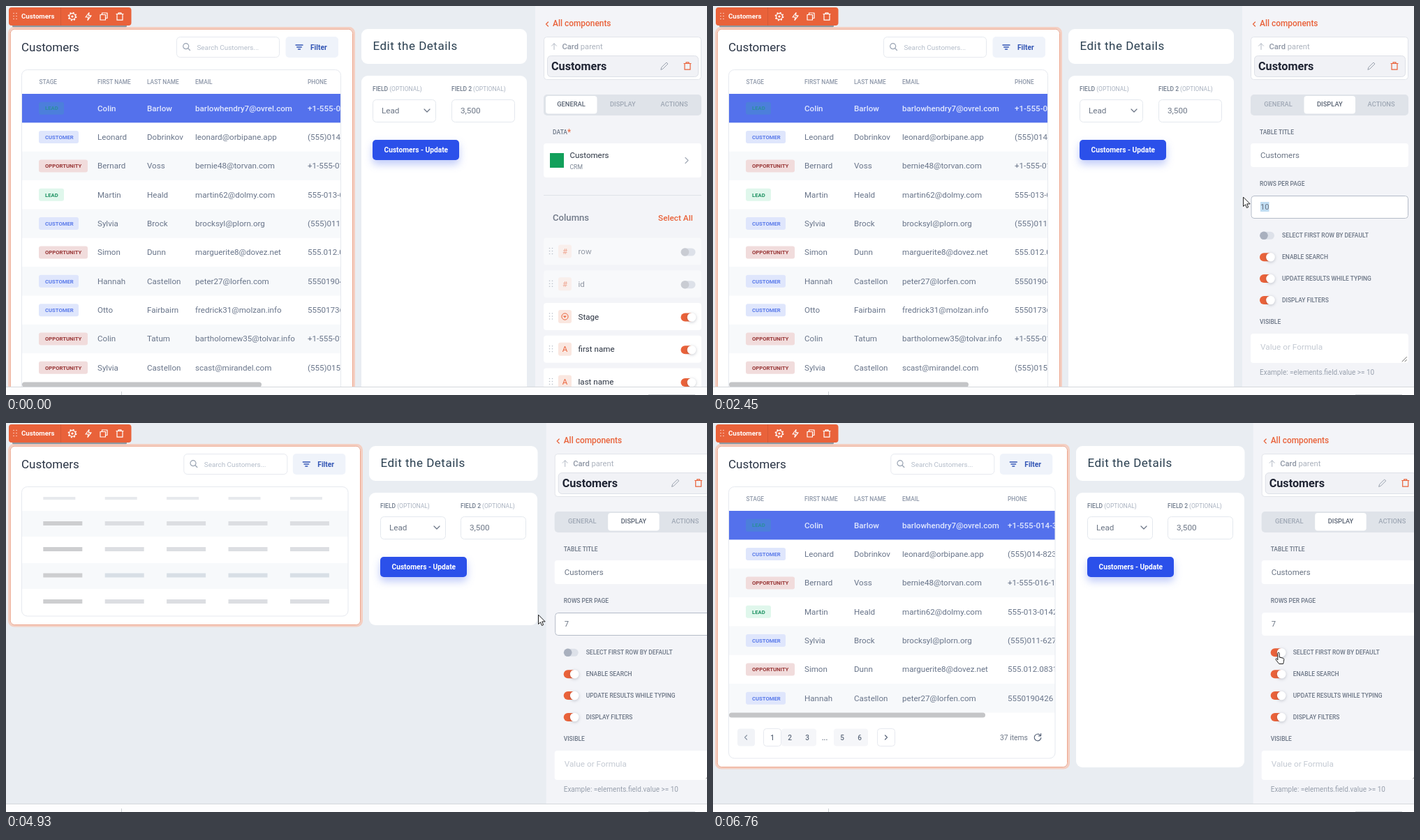
An HTML page that plays this animation: 1004x558 px, repeating every 7.51 s.

```html
<!DOCTYPE html>
<html lang="en">
<head>
<meta charset="utf-8">
<title>Table builder</title>
<style>
html, body { margin: 0; width: 100%; height: 100%; overflow: hidden; background: #e9edf2; }
svg { display: block; }
body > svg { width: 100vw; height: 100vh; }
text { font-family: Roboto, "Open Sans", sans-serif; white-space: pre; }
.glow { filter: drop-shadow(0 6px 6px rgba(43, 80, 234, .3)); }
.knob { filter: drop-shadow(0 1px 2px rgba(60, 70, 90, .3)); }
</style>
</head>
<body>
<svg id="stage" viewBox="0 0 1004 558"></svg>
<script>
const LOOP = 7510, WIDE = 3560, ORANGE = '#e9623a', GREY = '#6b7585', PALE = '#e6e9ef';
const stage = document.getElementById('stage');

const text = (x, y, s, size, fill, weight = 400, more = '') =>
  `<text x="${x}" y="${y}" font-size="${size}" fill="${fill}" font-weight="${weight}" ${more}>${s}</text>`;
const mid = (x, y, s, size, fill, weight) => text(x, y, s, size, fill, weight, 'text-anchor="middle"');
const box = (x, y, w, h, fill, r = 0, stroke = 'none', sw = 1) =>
  `<rect x="${x}" y="${y}" width="${w}" height="${h}" fill="${fill}" rx="${r}" stroke="${stroke}" stroke-width="${sw}"/>`;
const dot = (x, y, r, fill, more = '') => `<circle cx="${x}" cy="${y}" r="${r}" fill="${fill}" ${more}/>`;
const path = (d, stroke, w = 1.2, fill = 'none') =>
  `<path d="${d}" stroke="${stroke}" stroke-width="${w}" fill="${fill}" stroke-linejoin="round" stroke-linecap="round"/>`;
const at = (x, y, s) => `<g transform="translate(${x} ${y})">${s}</g>`;
// Spans are pairs of start and end times in ms.
const on = (spans, s) => `<g data-on="${spans}">${s}</g>`;

const grip = (x, y, fill) => [0, 1, 2].map(i =>
  dot(x, y + i * 4, .8, fill) + dot(x + 4, y + i * 4, .8, fill)).join('');
const trash = (x, y, c) => at(x, y, path('M-5-3.5H5M-2-3.5V-5.2H2V-3.5M-4-3.5V5.2H4V-3.5', c));
const lens = (x, y) => at(x, y, path('M3 3L5.5 5.5', '#9aa4b3') + dot(-.3, -.3, 4, 'none', 'stroke="#9aa4b3" stroke-width="1.2"'));
const chevron = (x, y, dir, c, k = 3) => at(x, y, path(
  { l: `M${k / 2}-${k}L${-k / 2} 0 ${k / 2} ${k}`, r: `M${-k / 2}-${k}L${k / 2} 0 ${-k / 2} ${k}`, d: `M${-k - 1}-2L0 2 ${k + 1}-2` }[dir], c));
const toggle = (x, y, isOn, knob = '#a9b0be') => isOn
  ? box(x, y - 6, 20, 12, ORANGE, 6) + dot(x + 15.5, y, 6.3, '#fff', 'class="knob"')
  : box(x, y - 5.5, 21, 11, '#dde1e9', 5.5) + dot(x + 6, y, 5.8, knob);

// first name, last name, email, phone, stage
const people = [
  'Colin|Barlow|barlowhendry7@ovrel.com|+1-555-014-3682|Lead',
  'Leonard|Dobrinkov|leonard@orbipane.app|(555)014-8236|Customer',
  'Bernard|Voss|bernie48@torvan.com|+1-555-016-1970|Opportunity',
  'Martin|Heald|martin62@dolmy.com|555-013-0142|Lead',
  'Sylvia|Brock|brocksyl@plorn.org|(555)011-6270x41|Customer',
  'Simon|Dunn|marguerite8@dovez.net|555.012.0831x4|Opportunity',
  'Hannah|Castellon|peter27@lorfen.com|5550190426|Customer',
  'Otto|Fairbairn|fredrick31@molzan.info|5550173628|Customer',
  'Colin|Tatum|bartholomew35@tolvar.info|+1-555-018-4520|Opportunity',
  'Sylvia|Castellon|scast@mirandel.com|(555)015-3402|Opportunity'
].map(s => s.split('|'));
const badges = {
  Lead: [36, '#e0f7ec', '#1f9363'],
  Customer: [57, '#dfe6fc', '#5b7bea'],
  Opportunity: [70, '#f1dcdc', '#983636']
};

function badge(stage, y, picked) {
  const [w, bg, ink] = badges[stage];
  return box(47, y - 9, w, 18, picked ? '#4c7fdb' : bg, 3) +
    text(56, y + 2.8, stage.toUpperCase(), 7.7, picked ? '#2c8f9c' : ink, 700);
}

const heads = (names, cols) => names.map((n, i) => text(cols[i], 112, n, 8.4, '#8e98a9', 500)).join('');
const frameTable = (right, bottom) => box(22.5, 91.5, right - 22.5, bottom - 91.5, 'none', 8, PALE);

function table(right, bottom, cols, rowH, count, plain, bar, barY) {
  let s = '';
  people.slice(0, count).forEach((p, i) => {
    const top = 126 + i * rowH, y = top + rowH / 2, first = i === 0;
    if (i % 2 === 0) s += box(23, top, right - 23, rowH, first ? '#5471ec' : '#f7f9fb');
    const cell = (n, v, c) => text(cols[n], y + 4, v, 11.6, first ? '#e0e7fd' : c, first ? 500 : 400);
    s += plain ? cell(0, p[4], '#474d57') : badge(p[4], y, first);
    for (let n = 0; n < 4; n++) s += cell(n + 1, p[n], '#69758a');
  });
  return `<svg width="${right}" height="558">` +
    heads(['STAGE', 'FIRST NAME', 'LAST NAME', 'EMAIL', 'PHONE'], cols) + s + '</svg>' +
    frameTable(right, bottom) + box(23, barY, bar, 7, '#c4c5c7', 3.5);
}

function pager(y, full) {
  const num = (x, n) => mid(x, y + 3.7, n, 10, '#5f6b7d', 500);
  const tile = (x, w, c) => box(x, y - 12.5, w, 25, c, 4);
  const edge = x => box(x, y - 12.5, 25, 25, '#fff', 4, PALE);
  return tile(35, 25, '#f1f3f7') + chevron(47, y, 'l', '#8b95a5') +
    (full ? tile(98, 50, '#f5f6f9') + tile(173, 49, '#f5f6f9') +
      [[110, 2], [135, 3], [160, '...'], [185, 5], [210, 6]].map(a => num(...a)).join('') +
      text(411, y + 3.7, '37 items', 10.3, GREY) : '') +
    edge(72.5) + num(85, 1) + edge(full ? 235.5 : 110.5) + chevron(full ? 248 : 123, y, 'r', '#59657a') +
    at(465, y, path('M3.6-3.2A4.8 4.8 0 1 0 4.8 .6M4.6-5.4V-2.2H1.4', '#59657a'));
}

const frame = (right, bottom) =>
  box(4.5, 31.5, right - 3, bottom - 30.5, 'none', 7, '#f4cfc2', 3) +
  box(6.3, 33.3, right - 6.8, bottom - 33.8, 'none', 6, '#eda68d');

const card = (right, bottom) => box(5, 33, right - 5, bottom - 33, '#fff', 8);

const topBar = dx => text(22, 65, 'Customers', 17, '#2a3445') +
  box(244.5 + dx, 44.5, 147 + dx / 10, 29, '#fff', 5, PALE) + lens(258 + dx, 58) +
  text(273.5 + dx, 62.7, 'Search Customers...', 9.9, '#b3bcc9') +
  box(400.5 + dx, 44, 75.5, 30, '#eff3fa', 5) +
  at(420 + dx, 59, path('M-5-3H5M-3.3 0H3.3M-1.5 3H1.5', '#3356b5', 1.4)) +
  text(436 + dx, 62.5, 'Filter', 10.2, '#3356b5', 700);

const formCard = (x, w, bottom) => box(x, 100, w, bottom - 100, '#fff', 9);

function form(x, w, fieldW, x2) {
  const left = x + 16.5, field = (fx, name, value) =>
    text(fx, 121.5, `${name}<tspan fill="#a9b2c0" font-weight="400"> (OPTIONAL)</tspan>`, 8.5, '#6f7b8c', 500) +
    box(fx + .5, 134.5, fieldW, 32, '#fff', 5, '#e4e8ee') + text(fx + 13, 154, value, 11.7, GREY);
  return box(x, 33, w, 50, '#fff', 9) +
    text(left, 63, 'Edit the Details', 17, '#2a3f50', 400, 'letter-spacing=".5"') +
    field(left - .5, 'FIELD', 'Lead') + chevron(left + fieldW - 12.5, 150, 'd', '#6b7585') + field(x2, 'FIELD 2', '3,500') +
    `<g class="glow">${box(left - .5, 192, 124, 29, '#2b50ea', 5)}</g>` +
    text(left + 16, 210, 'Customers - Update', 10.2, '#fff', 700);
}

function skeleton() {
  const bars = (y, w, h, c, from = 0, to = 5) => {
    let s = '';
    for (let i = from; i < to; i++) s += box(53.3 + i * 88.4, y - h / 2, w, h, c);
    return s;
  };
  const rows = [144, 181, 218.5, 256];
  const lead = c => rows.map(y => bars(y, 56, 6, c, 0, 1)).join('');
  return [126, 201].map(y => box(23, y, 467, 37, '#f7f9fb')).join('') + frameTable(490, 277) +
    bars(108, 46, 4, '#e7e9ed') + rows.map((y, i) => bars(y, 56, 6, i === 2 ? '#d8dfe6' : '#dcdee2', 1)).join('') +
    on('0,4170', lead('#d6d6d8')) + on('4170,9999', lead('#cdced0'));
}

const toolbar = box(9, 27, 164, 3.2, '#8e979f', 1.5) + box(4, 2, 175.5, 26, ORANGE, 4) +
  grip(11, 10.5, '#fbd5c8') + text(22, 18, 'Customers', 9.7, '#fff', 700) + box(78, 2, 1, 26, '#d65a35') +
  at(95, 15, dot(0, 0, 4.4, 'none', 'stroke="#fff" stroke-width="1.2"') + dot(0, 0, 1.6, '#fff') +
    dot(0, 0, 5.6, 'none', 'stroke="#fff" stroke-width="1.6" stroke-dasharray="2 2.4"')) +
  at(118, 15, path('M1-5.5L-4 1H0L-1 5.5 4-1.2H.4Z', '#fff')) +
  at(140, 15, path('M-2.5-2.5V-5H5V2.5H2.5M-5-2.5H2.5V5H-5Z', '#fff')) + trash(163, 15, '#fff');

const label = (x, y, s) => text(x, y, s, 8.5, GREY, 500);
const tabs = active => box(770, 127, 226, 30, '#dfe3e9', 5) + box(773 + active * 73.5, 129, 73.5, 25.5, '#fff', 4) +
  ['GENERAL', 'DISPLAY', 'ACTIONS'].map((n, i) =>
    mid(809.5 + i * 73.8, 144.4, n, 9.3, i === active ? '#586272' : '#9fa8b5', 500)).join('');

function column(name, icon, y, isOn) {
  const glyph = icon ? mid(800.5, y + 4, icon, 11.5, ORANGE, 400)
    : dot(800.5, y, 4.6, 'none', `stroke="${ORANGE}"`) + path(`M798.6 ${y - .8}h3.8l-1.9 2.2z`, ORANGE, .5, ORANGE);
  return box(770, y - 19.5, 226, 39, isOn ? '#fff' : '#f8f9fb', 4) + grip(778.5, y - 4.5, '#b9bfc9') +
    `<g opacity="${isOn ? 1 : .55}">${box(791, y - 9.5, 19, 19, '#fae7e0', 3) + glyph}</g>` +
    text(819.5, y + 4, name, 11.6, isOn ? '#2a3240' : '#9097a3') +
    toggle(966.5, y + 1, isOn, '#c9ccd3');
}

const general = tabs(0) + on('820,1350', mid(883.3, 144.4, 'DISPLAY', 9.3, '#77808e', 500)) +
  label(783, 184, 'DATA') + text(804, 185, '*', 12, ORANGE) +
  box(770, 197, 226, 49, '#fff', 4) + box(779, 211, 20, 21, '#12a05b') +
  text(807.5, 218, 'Customers', 11.5, '#2b3442') + text(807.5, 234, 'CRM', 8.6, '#7b8594') +
  chevron(975, 221.5, 'r', '#a2aab6', 4) + box(770, 271, 226, 1, '#dfe2e8') +
  text(783, 308, 'Columns', 13.1, '#717a89', 500) + text(934, 308, 'Select All', 11.8, ORANGE, 500) +
  column('row', '#', 352, false) + column('id', '#', 398.7, false) + column('Stage', '', 445.5, true) +
  column('first name', 'A', 492.2, true) + column('last name', 'A', 539, true);

const display = tabs(1) + label(783, 184, 'TABLE TITLE') + box(770, 197, 226, 34, '#fff', 4) +
  text(784, 218, 'Customers', 11.5, GREY) + label(783, 258, 'ROWS PER PAGE') +
  box(770.5, 272, 225.5, 33, '#fff', 4) +
  on('2050,6560', box(771, 272.5, 224.5, 32, '#fff', 4, '#b4bbc8')) +
  on('2190,3290', box(784, 281, 12.5, 14, '#c0ddf2')) +
  on('0,3290', text(784, 292, '10', 11.3, GREY)) + on('3290,9999', text(784, 292, '7', 11.3, GREY)) +
  on('3290,3830,4370,4930,5470,6560', box(788.3, 281, 1, 14, '#222')) +
  on('0,6630', toggle(783, 329.3, false)) + on('6630,9999', toggle(783, 329.3, true)) +
  ['SELECT FIRST ROW BY DEFAULT', 'ENABLE SEARCH', 'UPDATE RESULTS WHILE TYPING', 'DISPLAY FILTERS'].map((n, i) =>
    (i ? toggle(783, 329.3 + i * 30.9, true) : '') + label(815, 332.2 + i * 30.9, n)).join('') +
  label(783, 455.5, 'VISIBLE') + box(770, 470, 226, 42, '#fff', 4) +
  text(784, 493, 'Value or Formula', 11.8, '#c4cad3') + path('M987 510L993.500 503.500M991 510L993.500 507.500', '#777', 1) +
  text(783, 529, 'Example: =elements.field.value >= 10', 10, '#98a0ad');

const panel = box(758, 0, 262, 546, '#f3f4f8') + chevron(775, 26, 'l', ORANGE) +
  text(783, 29, 'All components', 11.9, ORANGE, 500) + box(770.5, 44.5, 225, 61, '#fff', 4, '#e1e4ea') +
  at(785, 58, path('M0 4.500V-4M-3.500-.8L0-4.300 3.500-.8', '#b2b9c4', 1)) +
  text(796.5, 62, 'Card<tspan fill="#abb2bd" font-weight="400"> parent</tspan>', 11.2, '#8d95a3', 500) +
  box(775.5, 71.5, 216, 30, '#f1f2f6', 5, '#dde0e7') + text(781, 91.500, 'Customers', 16.2, '#1f2433', 700) +
  at(943, 86, path('M-5 5L-4 1.800 3-5 5-3-2 4Z', '#9aa2ae', 1)) + trash(976, 86, ORANGE) +
  on('0,1350', general) + on('1350,9999', display);

const cursor = '<g id="cursor"><g id="halo">' + dot(0, 0, 11.2, '#f4e935', 'opacity=".75"') + '</g>' +
  '<g id="arrow">' + path('M0 0V13L3 10.200 5 15 7.200 14 5.200 9.400H9.300Z', '#222', 1, '#fff') + '</g>' +
  '<g id="hand" transform="translate(-4.7 -.3)">' +
  path('M3.5 10.5V1.5a1.2 1.2 0 0 1 2.4 0V7l5 1.2q1.8.5 1.6 2.3L12 13.5 11.3 16.5H5.5L1 10.8q-.9-1.4.4-1.9.9-.2 2.1 1.6Z', '#222', 1, '#fff') + '</g>' +
  '<g id="beam">' + path('M-2-7H2M0-7V7M-2 7H2', '#333', 1) + '</g></g>';

const wideCols = [47.5, 131, 202, 271, 422];
stage.innerHTML = box(0, 0, 1004, 558, '#e9edf2') +
  on('0,3560', card(497, 600) + frame(497, 600) + topBar(0) +
    table(479.5, 600, [47.5, 131, 202, 271, 432], 41.35, 10, false, 343, 539.5) +
    formCard(509, 237, 600) + form(509, 237, 90, 638)) +
  on('3560,9999',
    on('3560,3630', card(508, 233.5) + frame(508, 199) + frameTable(490, 185) + pager(155, false) + formCard(520, 241, 233.5) +
      heads(['STAGE', 'FIRST NAME', 'LAST NAME', 'EMAIL', 'PHONE', 'AMOUNT, $'], [47, 107, 197, 284, 345, 410])) +
    on('3630,5270', card(508, 290) + frame(508, 290) + skeleton() + formCard(520, 241, 290)) +
    on('5270,5340', card(508, 467) + frame(508, 467) + pager(424, true) + formCard(520, 241, 467) +
      table(490, 454, [47.5, 125, 197, 265.5, 417], 37.4, 7, true, 371, 388)) +
    on('5340,9999', card(508, 494) + frame(508, 494) + pager(451, true) + formCard(520, 241, 494) +
      table(490, 481, wideCols, 41.35, 7, false, 367, 415.5)) +
    topBar(10.3) + form(520, 241.5, 93, 651)) +
  toolbar + `<g id="panel">${panel}</g>` +
  box(0, 546, 1004, 12, '#fdfdfe') + box(0, 546, 1004, 1, '#d5d8dc') + box(165, 553, 1, 5, '#ccd0d5') +
  box(920, 557, 67, 1, '#d5d8dc') + cursor;

// time, x, y of the pointer tip
const route = [[0, 938, 545], [480, 901, 236], [820, 870, 143.5], [1622, 870, 143.5], [1980, 825, 280], [2050, 797, 288],
  [2320, 759.5, 274.5], [2812, 759.5, 274.5], [3020, 762.5, 275.5], [5800, 762.5, 275.5], [6360, 810, 329.3], [LOOP, 810, 329.3]];
const pointers = {
  cursor: [70, LOOP],
  halo: [1220, 1420, 2050, 2450, 6560, 6760],
  hand: [890, 1690, 6290, LOOP],
  beam: [1980, 2250],
  arrow: [70, 890, 1690, 1980, 2250, 6290]
};
const STEP = 69;

const within = (spans, t) => spans.some((a, i) => i % 2 === 0 && t >= a && t < spans[i + 1]);
const layers = [...stage.querySelectorAll('[data-on]')].map(el => [el, el.dataset.on.split(',').map(Number)]);
for (const id in pointers) layers.push([document.getElementById(id), pointers[id]]);
const pointer = document.getElementById('cursor'), side = document.getElementById('panel');

function tip(t) {
  const i = route.findIndex(p => p[0] > t), [t0, x0, y0] = route[i - 1], [t1, x1, y1] = route[i];
  const k = Math.floor((t - t0) / STEP) * STEP / (t1 - t0);
  return [x0 + (x1 - x0) * k, y0 + (y1 - y0) * k];
}

function draw(t) {
  for (const [el, spans] of layers) el.style.display = within(spans, t) ? '' : 'none';
  side.setAttribute('transform', `translate(${t < WIDE ? 0 : 15.7})`);
  pointer.setAttribute('transform', `translate(${tip(t)})`);
}

const start = performance.now();
function tick(now) {
  draw(Math.max(0, now - start) % LOOP);
  requestAnimationFrame(tick);
}
draw(0);
requestAnimationFrame(tick);
</script>
</body>
</html>
```
